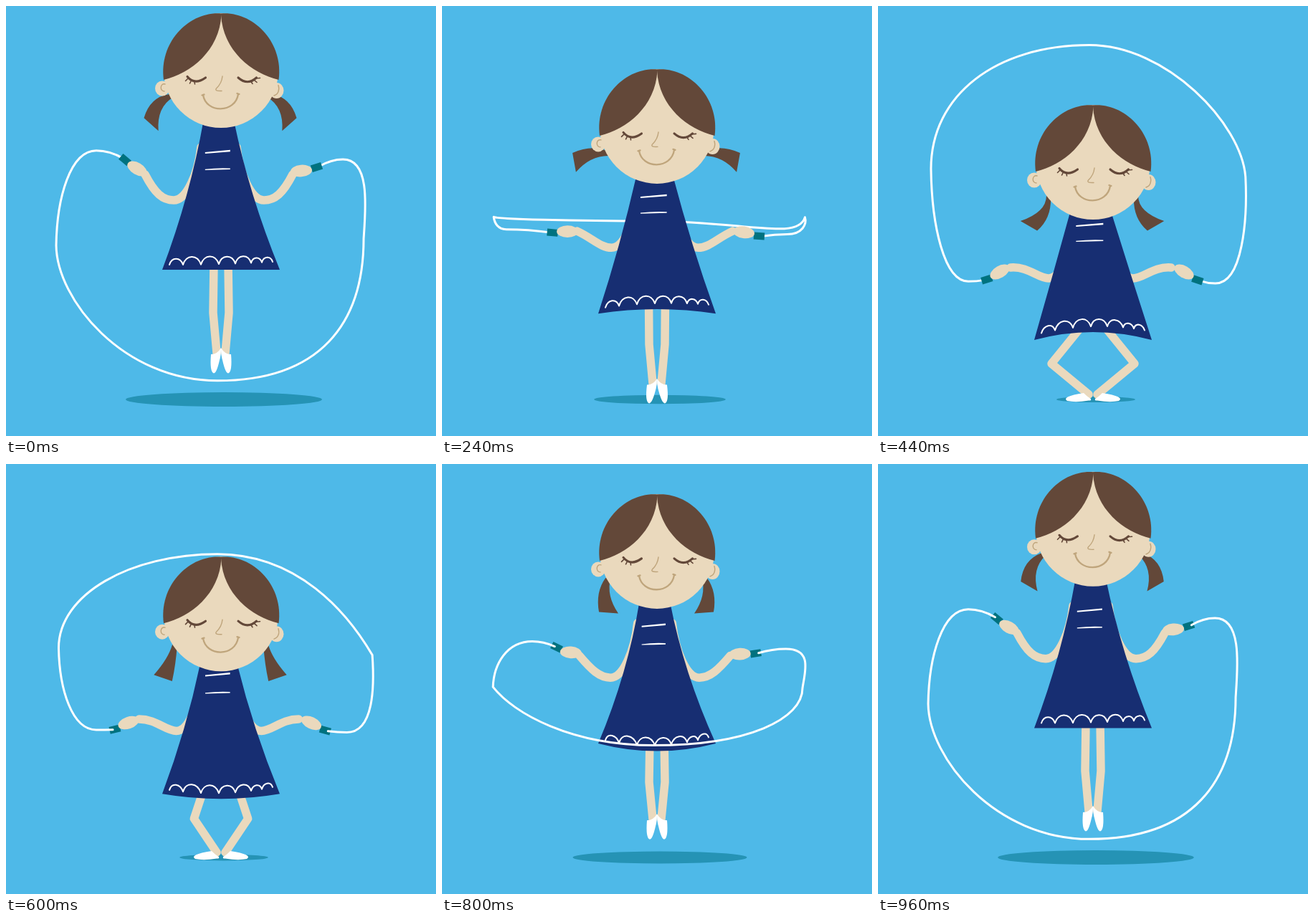
An HTML page with a canvas that plays this animation: 600 by 600 pixels, repeating every 1000 ms.

```html
<!DOCTYPE html>
<html lang="en">
<head>
<meta charset="utf-8">
<title>Skipping rope</title>
<style>
html, body { margin: 0; width: 100%; height: 100%; overflow: hidden; background: #4eb9e8; }
canvas { display: block; width: 600px; height: 600px; }
</style>
</head>
<body>
<canvas id="stage" width="600" height="600"></canvas>
<script>
const ctx = document.getElementById('stage').getContext('2d');
const SKY = '#4eb9e8', SKIN = '#ead9bd', HAIR = '#634839', DRESS = '#172e72',
      SHADE = '#2593b5', GRIP = '#00727f', LINE = '#bfa57c', WHITE = '#fff';
const LOOP = 1000, STEP = 40, FALL_END = 440, RISE_START = 480;

// [time, value] turning points, eased in between
const TAIL_SWING = [[210, 80], [440, 28], [800, 2]];
const TAIL_BEND = [[0, 1], [240, 0.7], [440, -0.9], [800, 0.7]];
const HEM_SWAY = [[0, 0], [440, -1], [660, 1], [780, 1], [960, 0]];

const LACE_X = [228, 247, 272, 297, 320, 342, 357, 372];
const SHOE_DOWN = [286, 486, 295, 486, 300, 477, 300, 488, 298, 494, 294, 512, 290, 512.5, 284, 511];
const SHOE_FLAT = [287, 540, 293, 546, 297, 548, 298, 551, 294, 550.5, 276, 553.5, 264, 551, 255, 545];

const clamp = v => Math.min(1, Math.max(0, v));
const mix = (a, b, w) => a + (b - a) * w;
const smooth = u => u * u * (3 - 2 * u);
const rad = deg => deg * Math.PI / 180;
const polar = (x, y, r, deg) => [x + r * Math.cos(rad(deg)), y + r * Math.sin(rad(deg))];

function turning(points, t) {
  const n = points.length;
  if (t < points[0][0]) t += LOOP;
  let i = n - 1;
  while (points[i][0] > t) i--;
  const [t0, v0] = points[i], [t1, v1] = points[(i + 1) % n];
  const end = i === n - 1 ? t1 + LOOP : t1;
  return mix(v0, v1, smooth((t - t0) / (end - t0)));
}

// symmetric ease-in-out bezier
function ease(x) {
  const a = 0.59;
  let lo = 0, hi = 1;
  for (let i = 0; i < 24; i++) {
    const u = (lo + hi) / 2, v = 1 - u;
    if (3 * v * v * u * a + 3 * v * u * u * (1 - a) + u * u * u < x) lo = u; else hi = u;
  }
  return smooth(lo);
}

// 0 at the top of the jump, 1 in the deepest crouch
function depth(t) {
  if (t < FALL_END) return ease(t / FALL_END);
  return t < RISE_START ? 1 : 1 - ease((t - RISE_START) / (LOOP - RISE_START));
}

function fill(color, path) {
  ctx.fillStyle = color;
  ctx.fill(new Path2D(path));
}

function stroke(color, width, path) {
  ctx.strokeStyle = color;
  ctx.lineWidth = width;
  ctx.stroke(new Path2D(path));
}

function oval(color, x, y, rx, ry, deg = 0) {
  ctx.beginPath();
  ctx.ellipse(x, y, rx, ry, rad(deg), 0, 7);
  ctx.fillStyle = color;
  ctx.fill();
}

// draw as is and mirrored; sum = left x + right x
function both(sum, draw) {
  draw();
  ctx.save();
  ctx.translate(sum, 0);
  ctx.scale(-1, 1);
  draw();
  ctx.restore();
}

function handsAt(d) {
  const left = { x: 183 - 13 * d, y: 227 + 144 * d, turn: -30 * (2 * d - 1) ** 3, tilt: 40 - 57 * d };
  const right = { x: 412 + 15 * d, y: 230 + 141 * d, turn: -5 + 35 * d * d, tilt: -18 + 36 * d };
  left.grip = polar(left.x, left.y, -21, 36 - 66 * d);
  right.grip = polar(right.x, right.y, 22, -13 + 44 * d);
  return { left, right };
}

function drawTails(head, t) {
  const a = rad(turning(TAIL_SWING, t)), k = turning(TAIL_BEND, t);
  const x = 234 - 4 * k, y = head + 132 - 7 * k;
  // along the tail, then sideways
  const at = (v, n) => `${x - v * Math.sin(a) - n * Math.cos(a)} ${y + v * Math.cos(a) - n * Math.sin(a)} `;
  both(598, () => fill(HAIR,
    'M' + at(0, 3) + 'Q' + at(20, 6 + 15 * k) + at(48, 14 - 5 * k) +
    'L' + at(49, -13 - 5 * k) + 'Q' + at(25, -7 + 12 * k) + at(0, -4) + 'Z'));
}

function drawArms(d, hand) {
  const sx = 272 + 3 * d, sy = 197 + 100 * d, ex = 234 + 4 * d, ey = 271 + 109 * d;
  const wx = hand.x + 11 + 4 * d, wy = hand.y + 8 - 14 * d;
  both(594, () => stroke(SKIN, 11.5,
    `M${sx} ${sy}C${sx - 4} ${sy + (ey - sy) / 2} ${ex + 18} ${ey} ${ex} ${ey}` +
    `C${ex - 15} ${ey} ${wx + 14 + 11 * d} ${wy + 27 - 29 * d} ${wx} ${wy}`));
}

function drawLegs(d, k, hem) {
  const bend = clamp((d - 0.6) / 0.4), flat = clamp((d - 0.6) / 0.25);
  const down = 42 * clamp(d / 0.6) ** 1.5;
  const hip = 290 - 5 * bend - 64 * bend * (1 - bend), knee = 289 - 47 * bend ** 3;
  const f = SHOE_DOWN.map((v, i) => mix(i % 2 ? v + down : v, SHOE_FLAT[i], flat));
  both(600, () => {
    stroke(SKIN, 11.5, `M${hip} ${hem - 9}L${knee} ${428 + 71 * k}L294 ${484 + down + 16 * flat}`);
    fill(WHITE, `M${f[0]} ${f[1]}Q${f.slice(2, 6)}Q${f.slice(6, 10)}Q${f.slice(10, 14)}Q${f[14]} ${f[15]} ${f[0]} ${f[1]}Z`);
  });
}

function drawDress(d, head, corner, sway) {
  const lag = sway * 11;
  const top = head + 160, neck = 275.5 - 6 * d + 1.5 * sway, right = 593.5 - neck;
  const bulge = 10.5 - 6 * d + 4 * sway, cy = (top + corner) / 2;
  fill(DRESS,
    `M${neck} ${top}Q${(neck + 218) / 2 + bulge} ${cy} 218 ${corner}` +
    `Q300 ${corner + 2 * lag} 382 ${corner}` +
    `Q${(right + 382) / 2 - bulge} ${cy} ${right} ${top}Z`);

  const half = 17.5 + d / 2 - sway, l = 295.3 - half, r = 295.3 + half;
  const y1 = 203.5 + 99 * d - 3 * sway, y2 = 227.5 + 99 * d - sway;
  fill(WHITE, `M${l} ${y1 + 0.6}L${r} ${y1 - 2.7}L${r} ${y1 - 0.3}L${l} ${y1 + 2.6}Z`);
  fill(WHITE, `M${l} ${y2 + 0.2}Q295 ${y2 - 2} ${r} ${y2 - 1.1}L${r} ${y2 + 0.5}Q295 ${y2 + 1} ${l} ${y2 + 1.4}Z`);

  const base = x => corner - 7 - 4 * ((x - 228) / 144) ** 2 + lag * (1 - ((x - 300) / 82) ** 2);
  let lace = `M${LACE_X[0]} ${base(LACE_X[0])}`;
  for (let i = 1; i < LACE_X.length; i++) {
    const a = LACE_X[i - 1], b = LACE_X[i], w = b - a;
    lace += `C${a + 0.17 * w} ${base(a) - 0.58 * w} ${b - 0.2 * w} ${base(b) - 0.58 * w} ${b} ${base(b)}`;
  }
  stroke(WHITE, 2, lace);
}

function drawHead(y) {
  ctx.save();
  ctx.translate(0, y);
  oval(SKIN, 218, 115, 10, 10.5);
  oval(SKIN, 377.5, 118, 10, 11);
  oval(SKIN, 300, 90, 80, 80);
  stroke(LINE, 1.4, 'M222 109C215 107 214 119 221 119M380 110.5C382 117 380 123 374 125');
  both(600.5, () => fill(HAIR, 'M300.5 10.5C256 7 213 50 220 103C258 94 298 62 300.5 12Z'));
  stroke(HAIR, 3.1, 'M253 98.5Q263 111 278.5 100M324 100Q337 111.5 349.5 100');
  stroke(HAIR, 1.6, 'M254 101L250.5 104.5M258.5 104L256.5 108M263 105.5L263.5 109' +
    'M348 101L354.5 100.5M346 103L350 106.5M341.5 105L344 108.5');
  stroke(LINE, 1.4, 'M302 98Q301 108 293.5 115Q290.5 119 301 118.5');
  stroke(LINE, 2.3, 'M275 124C279 150 320 150 324 123M273.5 124.5L276.5 123.5M322.5 122L325.5 123');
  ctx.restore();
}

function drawHand({ x, y, turn, tilt, grip }) {
  ctx.save();
  ctx.translate(...grip);
  ctx.rotate(rad(tilt));
  ctx.fillStyle = GRIP;
  ctx.fillRect(-7.5, -5, 15, 10);
  ctx.restore();
  oval(SKIN, x, y, 15, 8.3, turn);
}

// the loop turns evenly about the hands; c is its height, 1 = lowest
function drawRope(t, { left, right }) {
  const c = Math.cos(2 * Math.PI * t / LOOP + 0.12);
  const slack = Math.exp(-((c / 0.15) ** 2));
  const fold = v => 120 * Math.max(0, v) * (1 - v);
  const a = polar(...left.grip, -3, left.tilt), b = polar(...right.grip, 4, right.tilt);
  const ly = left.grip[1], ry = right.grip[1];

  const low = (ly + ry) / 2 + 322 * c - 17 * c * c;
  const x1 = 126 - 42 * slack, y1 = ly - 5 - 8 * c;
  const x2 = 72 - 2 * c, y2 = ly + 140 * c - 20 * c * c - 16 * slack;
  const x4 = 506 - 7 * c, y4 = ry + 125 * c - 25 * c * c - 22 * slack;
  const x5 = 482 - 12 * c * c, y5 = ry - 3 - 8 * c;

  stroke(WHITE, 3,
    `M${a}Q${(a[0] + x1) / 2} ${y1} ${x1} ${y1}` +
    `C${mix(x1, x2, 0.65)} ${y1} ${x2 + 1} ${mix(y2, y1, 0.5)} ${x2} ${y2}` +
    `C${x2 + fold(c)} ${mix(y2, low, 0.5 - 0.1 * c)} ${185 - 22 * c * c} ${low} 295 ${low}` +
    `C${420 + 18 * c} ${low} ${x4 - 1.5 * fold(-c)} ${mix(y4, low, 0.5 + 0.1 * c) + 35 * slack} ${x4} ${y4}` +
    `C${x4 + 3} ${mix(y4, y5, 0.4)} ${x5 + 38 - 20 * slack} ${y5} ${x5} ${y5}` +
    `Q${(x5 + b[0]) / 2} ${y5} ${b}`);
}

function draw(t) {
  const d = depth(t), k = d - 0.025 * Math.sin(2 * Math.PI * d);
  const head = 128 * d, corner = 368 + 98 * k, sway = turning(HEM_SWAY, t);
  const hands = handsAt(d), front = t >= RISE_START;
  ctx.fillStyle = SKY;
  ctx.fillRect(0, 0, 600, 600);
  ctx.lineCap = ctx.lineJoin = 'round';
  oval(SHADE, 304, 549, 137 - 82 * d ** 1.2, 10 - 6 * d);
  if (!front) drawRope(t, hands);
  drawTails(head, t);
  drawArms(d, hands.left);
  drawLegs(d, k, corner + Math.min(0, 11 * sway));
  drawDress(d, head, corner, sway);
  drawHead(head);
  drawHand(hands.left);
  drawHand(hands.right);
  if (front) drawRope(t, hands);
}

const start = performance.now();
function tick() {
  const t = (performance.now() - start) % LOOP;
  draw(Math.floor(t / STEP) * STEP);
  requestAnimationFrame(tick);
}
tick();
</script>
</body>
</html>
```
